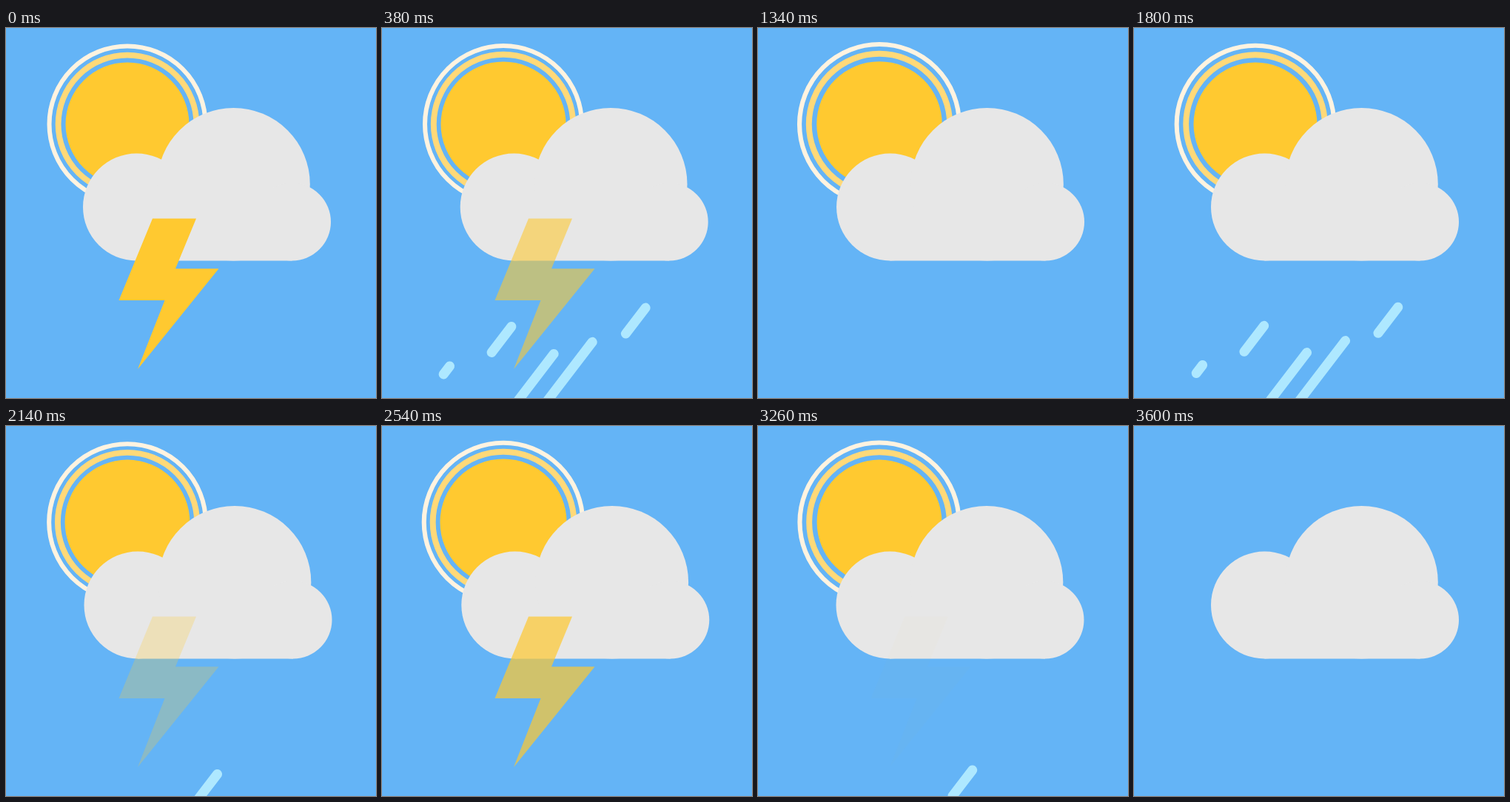
Write an HTML page that moves like this. It is 500x500 px and loops after 3620 ms.

```html
<!DOCTYPE html>
<html lang="en">
<head>
<meta charset="utf-8">
<title>Weather</title>
<style>
  html, body { margin: 0; width: 100%; height: 100%; overflow: hidden; background: #64b4f6; }
  svg { display: block; width: 100vw; height: 100vh; }
  .outer { fill: none; stroke: #fff3e0; stroke-width: 6; }
  .inner { fill: none; stroke: #ffd978; stroke-width: 7.8; }
  .disc, #bolt { fill: #ffc930; }
  #rain { stroke: #aee8ff; stroke-width: 13; stroke-linecap: round; }
  #cloud { fill: #e7e7e7; }
</style>
</head>
<body>
<svg viewBox="0 0 500 500">
  <clipPath id="below"><rect y="316" width="500" height="184"/></clipPath>
  <g id="sun">
    <circle class="outer" r="105.5"/>
    <circle class="inner" r="93.4"/>
    <circle class="disc" r="83.5"/>
  </g>
  <g clip-path="url(#below)"><g id="rain"></g></g>
  <g id="cloud">
    <circle cx="176.5" cy="242" r="72.5"/>
    <circle cx="307.5" cy="211.2" r="103.3"/>
    <circle cx="386.5" cy="262" r="52.5"/>
    <rect x="176.5" y="242" width="210" height="72.5"/>
  </g>
  <path id="bolt" d="M198 257.5H257L229 325.3H287.5L178 461L214.5 368H152.5Z"/>
</svg>
<script>
  const LOOP = 3620, HALF = 900, SLANT = 0.765;
  const byId = id => document.getElementById(id);
  const sun = byId('sun'), cloud = byId('cloud'), bolt = byId('bolt'), rain = byId('rain');
  const rings = [...sun.children];
  const delays = [240, 120, 0];

  // Each shower restarts every drop behind the cloud.
  const showers = [0, 1423, 2563];
  const drops = [
    { x: 93, y: 455, len: 11, speed: 0.49 },
    { x: 176, y: 402, len: 35, speed: 0.36 },
    { x: 234, y: 438, len: 90, speed: 0.6 },
    { x: 286, y: 422, len: 100, speed: 0.58 },
    { x: 357, y: 377, len: 35, speed: 0.274 }
  ];
  for (const d of drops) {
    d.el = document.createElementNS('http://www.w3.org/2000/svg', 'line');
    const ends = { x1: d.x, y1: d.y, x2: d.x - d.len * SLANT, y2: d.y + d.len };
    for (const k in ends) d.el.setAttribute(k, ends[k]);
    rain.append(d.el);
  }

  // Linear there-and-back between 0 and 1.
  const swing = t => {
    const p = Math.max(0, t) % (2 * HALF) / HALF;
    return p < 1 ? p : 2 - p;
  };

  const flash = t => t < 1400
    ? Math.max(0, 1 - t / HALF)
    : Math.max(0, 0.755 - Math.abs(t - 2594) / HALF);

  function draw(now) {
    const t = now % LOOP;
    sun.setAttribute('visibility', t < 3600 ? 'visible' : 'hidden');
    rings.forEach((ring, i) => ring.setAttribute('transform',
      `translate(164 130) scale(${1 + 0.03 * swing(t - delays[i])})`));
    cloud.setAttribute('transform', `translate(${4 * swing(t)} 0)`);
    bolt.setAttribute('opacity', flash(t));

    const age = t - showers.filter(s => s <= t).pop();
    for (const d of drops) {
      const dy = d.speed * (age - 377);
      d.el.setAttribute('transform', `translate(${-dy * SLANT} ${dy})`);
    }
  }

  const start = performance.now();
  function tick() {
    draw(performance.now() - start);
    requestAnimationFrame(tick);
  }
  tick();
</script>
</body>
</html>
```
